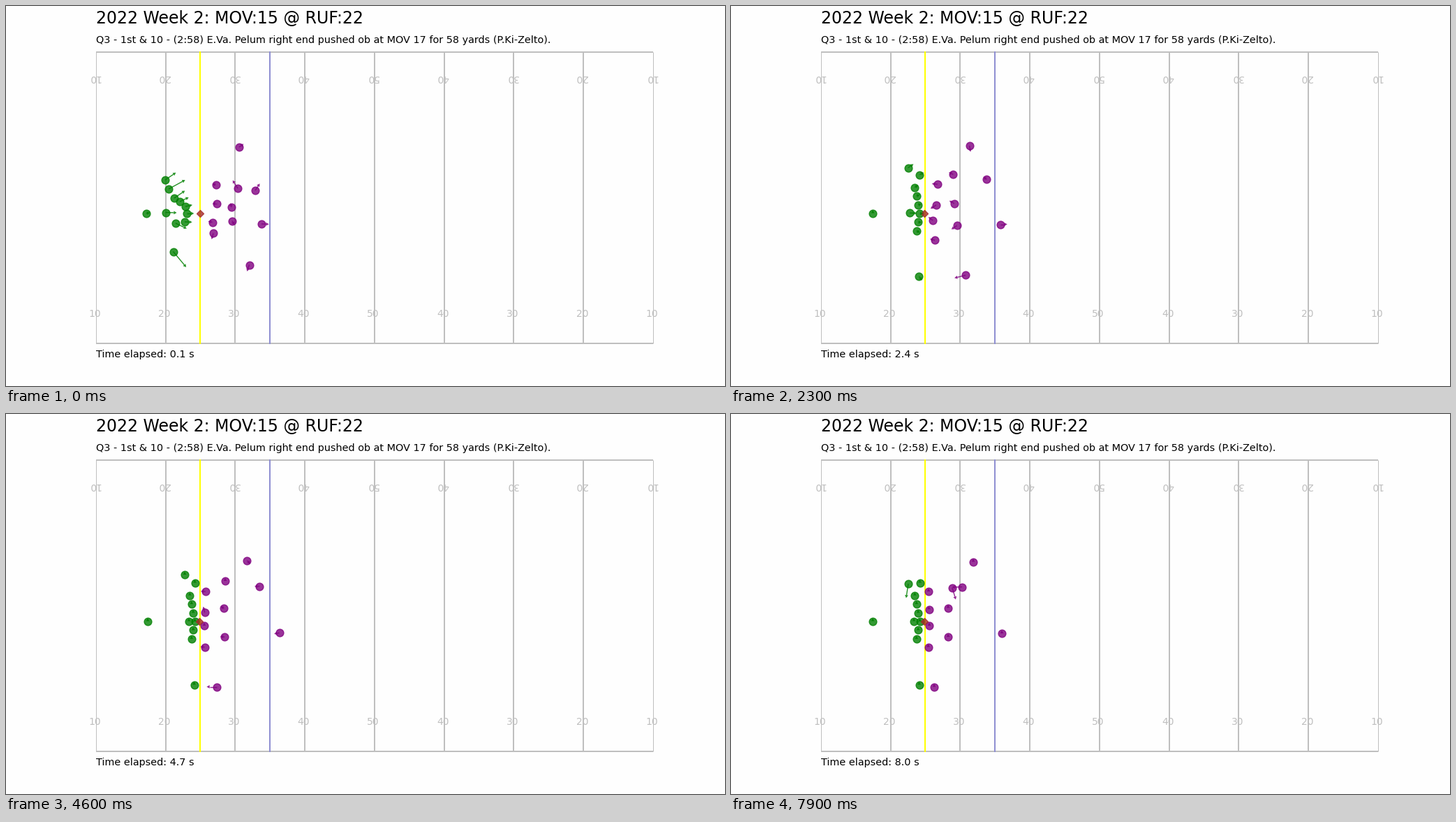
Write a matplotlib script that moves like this. It is 1030x544 px and loops after 8 s.

```python
import numpy as np
import matplotlib.pyplot as plt
from matplotlib.animation import FuncAnimation
from matplotlib.collections import LineCollection, PolyCollection

W, H, DPI = 1030, 544, 100
FRAMES, STEP = 80, 100
PT = 72 / DPI                               # points per pixel
LEFT, RIGHT = 0.125 * W, 0.9 * W
TOP, BOTTOM = 66, 483
GAP = (RIGHT - LEFT) / 8                    # ten yards
GRAY = "#bfbfbf"

plt.rcParams["font.family"] = "DejaVu Sans"
fig = plt.figure(figsize=(W / DPI, H / DPI), dpi=DPI, facecolor="#fefefe")
ax = fig.add_axes([0, 0, 1, 1])
ax.set(xlim=(0, W), ylim=(H, 0))
ax.axis("off")


def label(x, y, text, px, **kw):
    return ax.text(x, y, text, fontsize=px * PT, **kw)


def line(xs, ys, color, px=2):
    ax.plot(xs, ys, color=color, lw=px * PT, solid_capstyle="butt", zorder=1)


# ---- field ----
for y in (TOP, BOTTOM):
    line([LEFT, RIGHT], [y, y], GRAY)
for i in range(9):
    x = LEFT + i * GAP
    line([x, x], [TOP, BOTTOM], GRAY, 1 if i in (0, 8) else 2)
    yards = str(50 - 10 * abs(4 - i))
    style = dict(color=GRAY, ha="center", va="baseline", rotation_mode="anchor")
    label(x - 1.7, 444.7, yards, 13.9, **style)
    label(x - 2.5, 99, yards, 13.9, rotation=180, **style)
for yards, color in ((15, "yellow"), (25, "#8f8fd2")):
    x = LEFT + GAP * yards / 10
    line([x, x], [TOP - 1, BOTTOM + 1], color)

label(LEFT, 25, "2022 Week 2: MOV:15 @ RUF:22", 23.6)
label(LEFT, 52.7, "Q3 - 1st & 10 - (2:58) E.Va. Pelum right end pushed ob "
      "at MOV 17 for 58 yards (P.Ki-Zelto).", 14.35)
clock = label(LEFT, 503, "", 14.35)


# ---- motion: each helper returns a function of time giving a point ----
def settle(start, spot, length=2.4):
    """Jog to a spot, slowing down on the way."""
    a, b = np.array(start, float), np.array(spot, float)
    return lambda t: b + (a - b) * max(0, 1 - t / length) ** 1.7


def roam(*points, beat=1.8, blur=0.35):
    """Pass one key point per beat, with rounded corners, then stand."""
    p = np.array(points, float)
    p = np.vstack([2 * p[0] - p[1], p])     # already moving at the start
    beats = beat * (np.arange(len(p)) - 1)

    def at(t):
        near = t + np.linspace(-blur, blur, 9)
        return np.array([np.interp(near, beats, axis).mean() for axis in p.T])
    return at


def then_run(path, begin, shift, end=7.9):
    """Add a late burst that picks up speed."""
    shift = np.array(shift, float)
    return lambda t: path(t) + shift * max(0, (t - begin) / (end - begin)) ** 1.5


def velocity(path, t, h=0.05):
    return (path(t + h) - path(t - h)) / (2 * h)


# The line sets up evenly around the center; the others spread out behind it.
line_starts = [(241, 275), (249, 280), (257, 287), (259, 297), (256, 309), (243, 311)]
offense = [settle(start, (270.5 - 2.4 * abs(k), 297 + 12.45 * k))
           for k, start in enumerate(line_starts, -3)]
offense += [
    then_run(settle((228, 249), (256, 230), 3), 7, (-2, 13)),
    settle((233, 262), (270.5, 241.5)),
    settle((239.5, 351.5), (269.5, 387.5)),
    settle((228.5, 295.5), (262, 296.5), 3.6),
    settle((201, 297), (203, 296.5)),
]
defense = [
    roam((334, 202), (341, 197), (343, 208), (347, 211.5)),
    then_run(roam((332, 261), (320, 242), (314, 239)), 7, (3, 10)),
    then_run(roam((357, 264), (367, 249), (364, 246.5)), 4.3, (-33, 1)),
    roam((300.5, 256), (298.5, 255.5), (289, 254.5), (283, 254)),
    roam((302, 283), (297, 283), (286, 290), (283.5, 279.5)),
    roam((323, 288), (322, 284), (314, 279.5), (311, 277.5)),
    roam((295.5, 309.5), (291, 308.5), (284, 303)),
    roam((324, 307.5), (326.5, 312.5), (316, 319.5), (311, 319)),
    roam((297, 325.5), (294, 336), (287, 334), (282.5, 333.5)),
    roam((366, 312), (381.5, 312.5), (396, 312.5), (388, 314)),
    roam((348.5, 370.5), (344, 383.5), (315.5, 390.5), (291, 390.5)),
]
ball = settle((277.7, 296.7), (276.6, 297))


# ---- drawing ----
def arrow(p, v):
    speed = np.hypot(*v)
    d = v / speed if speed > 0.3 else np.array([0, -1.0])
    n = np.array([-d[1], d[0]])
    base = p + 0.75 * v
    return (p, base), (base + 2.4 * n, base + 4.2 * d, base - 2.4 * n)


class Team:
    def __init__(self, paths, color):
        self.paths = paths
        style = dict(lw=1.4 * PT, alpha=0.85, zorder=5)
        self.dots = ax.scatter([], [], s=60, color=color, alpha=0.8, zorder=4)
        self.shafts = LineCollection([], colors=color, **style)
        self.heads = PolyCollection([], facecolor=color, **style)
        ax.add_collection(self.shafts, autolim=False)
        ax.add_collection(self.heads, autolim=False)

    def show(self, t):
        spots = [path(t) for path in self.paths]
        self.dots.set_offsets(spots)
        arrows = [arrow(p, velocity(path, t)) for p, path in zip(spots, self.paths)]
        shafts, heads = zip(*arrows)
        self.shafts.set_segments(shafts)
        self.heads.set_verts(heads)


teams = [Team(offense, "green"), Team(defense, "purple")]
marker = ax.scatter([], [], s=26, marker="D", color="brown", alpha=0.8, zorder=4)


def draw(frame):
    t = frame * STEP / 1000
    for team in teams:
        team.show(t)
    marker.set_offsets([ball(t)])
    clock.set_text(f"Time elapsed: {t + 0.1:.1f} s")


anim = FuncAnimation(fig, draw, frames=FRAMES, interval=STEP, repeat=True,
                     repeat_delay=0, init_func=lambda: draw(0))
plt.show()
```
